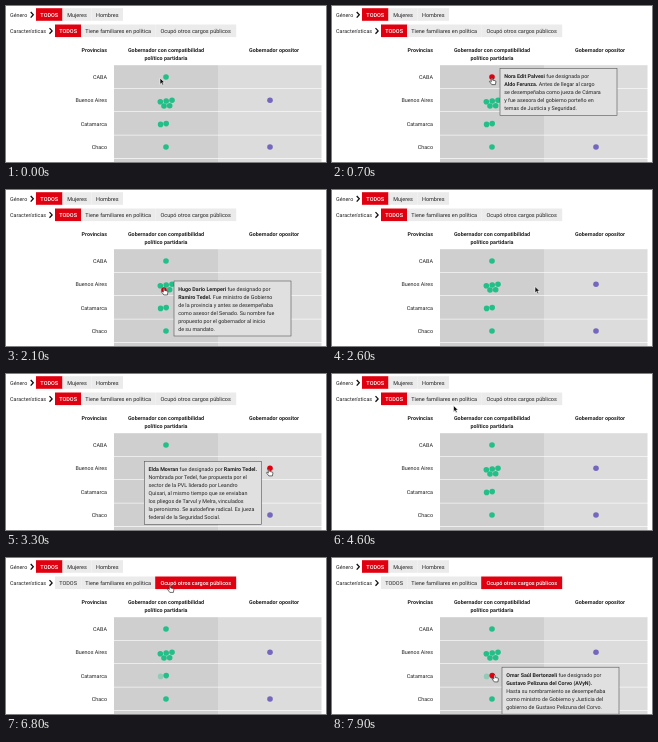
An HTML page for the animation above (8000 ms loop, 320x156 px).

```html
<!DOCTYPE html>
<html lang="es">
<head>
<meta charset="utf-8">
<style>
html, body { margin: 0; width: 100%; height: 100%; overflow: hidden; background: #fff; }
svg { display: block; width: 100%; height: 100%; }
text { font: 5.4px Roboto, Arial, sans-serif; fill: #222; text-rendering: geometricPrecision; white-space: pre; }
.button { font-size: 5.5px; text-anchor: middle; }
.tip { font-size: 5.35px; }
.bold { font-weight: 700; }
.middle { text-anchor: middle; }
.end { text-anchor: end; }
</style>
</head>
<body>
<svg id="stage" viewBox="0 0 320 156"></svg>
<script>
const LOOP = 8000, STEP = 100;
const RED = '#e1000f', GREEN = '#22bf88', VIOLET = '#7467bd';
const stage = document.getElementById('stage');

function add(name, attrs = {}, parent = stage) {
  const node = document.createElementNS('http://www.w3.org/2000/svg', name);
  for (const key in attrs) node.setAttribute(key, attrs[key]);
  parent.append(node);
  return node;
}
function label(x, y, content, cls = '', parent = stage) {
  const node = add('text', { x, y, class: cls }, parent);
  node.textContent = content;
  return node;
}
const rect = (x, y, width, height, fill, parent) => add('rect', { x, y, width, height, fill }, parent);

// Filter bars
function button(x, y, width, caption) {
  const box = rect(x, y, width, 12.6, '#ebebeb');
  const text = label(x + width / 2, y + 8.4, caption, 'button');
  return on => {
    box.setAttribute('fill', on ? RED : '#ebebeb');
    text.style.fill = on ? '#fff' : '#222';
    text.style.fontWeight = on ? 500 : 400;
  };
}
function chevron(x, y) {
  add('path', { d: `M${x} ${y - 2.8}l2.6 2.8l-2.6 2.8`, fill: 'none', stroke: '#111', 'stroke-width': 1.3 });
}
label(4, 10.6, 'Género');
chevron(24.7, 8.8);
button(30, 2.2, 26.5, 'TODOS')(true);
button(56.5, 2.2, 29, 'Mujeres');
button(85.5, 2.2, 31.5, 'Hombres');
label(4, 26.7, 'Características');
chevron(43.5, 24.9);
const filters = [
  button(49, 18.5, 26.2, 'TODOS'),
  button(75.2, 18.5, 74, 'Tiene familiares en política'),
  button(149.2, 18.5, 81, 'Ocupó otros cargos públicos')
];

// Table
label(101, 45.5, 'Provincias', 'bold end');
label(160, 45.5, 'Gobernador con compatibilidad', 'bold middle');
label(160, 53.8, 'político partidaria', 'bold middle');
label(268, 45.5, 'Gobernador opositor', 'bold middle');
['CABA', 'Buenos Aires', 'Catamarca', 'Chaco', ''].forEach((province, i) => {
  const y = 59.2 + i * 23.4;
  rect(108, y, 104, 22.8, '#cfcfcf');
  rect(212, y, 103.5, 22.8, '#dcdcdc');
  label(101, y + 13.7, province, 'end');
});

// x, y, colour, has relatives in politics, held other posts
const dots = [
  [160, 71, GREEN, 0, 1],
  [154.3, 95.8, GREEN, 0, 1], [160.2, 95, GREEN, 1, 1], [166, 94.2, GREEN, 0, 1],
  [158, 100, GREEN, 1, 1], [163.7, 99.7, GREEN, 0, 1],
  [154.6, 118.4, GREEN, 1, 0], [160.2, 117.6, GREEN, 0, 1],
  [160, 141, GREEN, 0, 1],
  [264, 94.2, VIOLET, 0, 1], [264, 141, VIOLET, 0, 1]
].map(([cx, cy, fill, relatives, posts]) => ({
  node: add('circle', { cx, cy, r: 2.8, fill }), fill, relatives, posts
}));

// Tooltips; text between asterisks is bold
function tooltip(start, end, dot, x, y, lines) {
  const group = add('g');
  const box = rect(x, y, 117, lines.length * 8.05 + 6.7, '#e0e0e0', group);
  box.setAttribute('stroke', '#555');
  box.setAttribute('stroke-width', .6);
  lines.forEach((line, i) => {
    const text = label(x + 4.2, y + 9.7 + i * 8.05, '', 'tip', group);
    line.split('*').forEach((part, j) => {
      add('tspan', { class: j % 2 ? 'bold' : '' }, text).textContent = part;
    });
  });
  return { start, end, dot, group };
}
const tips = [
  tooltip(200, 900, 0, 168, 62.5, [
    '*Nora Edit Palvesi* fue designada por', '*Aldo Ferunza.* Antes de llegar al cargo',
    'se desempeñaba como jueza de Cámara', 'y fue asesora del gobierno porteño en', 'temas de Justicia y Seguridad.'
  ]),
  tooltip(1700, 2300, 4, 168, 91, [
    '*Hugo Darío Lemperi* fue designado por', '*Ramiro Tedel.* Fue ministro de Gobierno',
    'de la provincia y antes se desempeñaba', 'como asesor del Senado. Su nombre fue',
    'propuesto por el gobernador al inicio', 'de su mandato.'
  ]),
  tooltip(3000, 4000, 9, 138.3, 87.3, [
    '*Elda Movran* fue designado por *Ramiro Tedel.*', 'Nombrada por Tedel, fue propuesta por el',
    'sector de la PVL liderado por Leandro', 'Quisari, al mismo tiempo que se enviaban',
    'los pliegos de Tarvul y Melra, vinculados', 'la peronismo. Se autodefine radical. Ex jueza',
    'federal de la Seguridad Social.'
  ]),
  tooltip(7700, LOOP, 7, 170, 109.2, [
    '*Omar Saúl Bertonzeli* fue designado por', '*Gustavo Pelizuna del Corvo (AVyN).*',
    'Hasta su nombramiento se desempeñaba', 'como ministro de Gobierno y Justicia del',
    'gobierno de Gustavo Pelizuna del Corvo.'
  ])
];

// Pointer: time, x, y of the tip
const path = [
  [0, 154, 72], [200, 160, 71], [900, 160, 72], [1200, 153, 86], [1600, 153, 93.8],
  [1700, 158, 98], [2200, 158, 98], [2600, 203, 96.5], [3000, 263, 95], [4000, 263, 95],
  [4600, 121.5, 31.5], [4900, 104, 26], [5800, 104, 26], [6300, 164, 27.5], [7200, 164, 27.5],
  [7700, 162.5, 117], [LOOP, 162.5, 117]
];
const handTimes = [[100, 900], [1500, 2300], [2900, 4000], [4700, 7300], [7700, LOOP]];
const outline = { 'stroke-width': .6, 'stroke-linejoin': 'round' };
const arrow = add('path', {
  d: 'M0 0v6.4l1.5-1.4l1 2.2l1.2-.5l-1-2.1h2z', fill: '#111', stroke: '#fff', ...outline
});
const hand = add('path', {
  d: 'M-.7.5q.7-.9 1.4 0v2l2.4.5q.9.2.8 1.1l-.5 2.8h-3.6l-2.3-3q.1-.9 1-.5l.8.7z',
  fill: '#fff', stroke: '#111', ...outline
});

const clamp = v => Math.max(0, Math.min(1, v));
const mix = (a, b, k) => a + (b - a) * k;

function pointerAt(t) {
  const i = path.findIndex(p => p[0] > t);
  const [t0, x0, y0] = path[i - 1], [t1, x1, y1] = path[i];
  const k = (t - t0) / (t1 - t0);
  return [mix(x0, x1, k), mix(y0, y1, k)];
}

function draw(t) {
  const selected = t < 5200 ? 0 : t < 6500 ? 1 : 2;
  filters.forEach((select, i) => select(i === selected));

  const relativesFade = clamp((t - 4800) / 700), postsFade = clamp((t - 6400) / 400);
  for (const dot of dots) {
    const filtered = mix(1, dot.relatives ? 1 : .3, relativesFade);
    dot.node.setAttribute('opacity', mix(filtered, dot.posts ? 1 : .35, postsFade));
    dot.node.setAttribute('fill', dot.fill);
  }
  for (const { start, end, dot, group } of tips) {
    const shown = t >= start && t < end;
    group.style.display = shown ? '' : 'none';
    if (shown) dots[dot].node.setAttribute('fill', RED);
  }

  const isHand = handTimes.some(([from, to]) => t >= from && t < to);
  const place = `translate(${pointerAt(t)})`;
  hand.setAttribute('transform', place);
  arrow.setAttribute('transform', place);
  hand.style.display = isHand ? '' : 'none';
  arrow.style.display = isHand ? 'none' : '';
}

const begin = performance.now();
function frame() {
  const t = (performance.now() - begin) % LOOP;
  draw(Math.floor(t / STEP) * STEP);
  requestAnimationFrame(frame);
}
frame();
</script>
</body>
</html>
```
